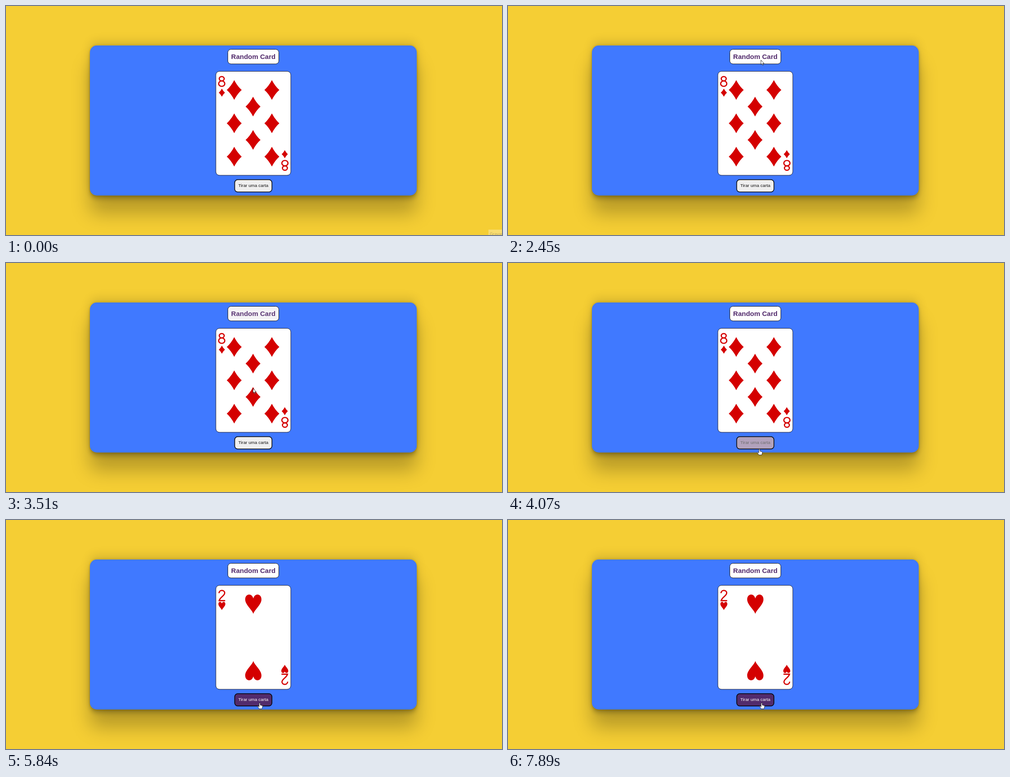
Write an HTML page that moves like this. It is 1099 px wide and 510 px high and loops after 8 s.

```html
<!DOCTYPE html>
<html lang="pt">
<head>
<meta charset="utf-8">
<title>Random Card</title>
<style>
html, body { margin: 0; width: 100%; height: 100%; overflow: hidden; background: #f5ce34; }
#panel {
  position: absolute; left: 186px; top: 88px; width: 724px; height: 334px;
  border-radius: 15px; background: #4079ff;
  box-shadow: 0 40px 41px rgba(0,0,0,.25), 0 -9px 22px rgba(0,0,0,.12), 0 3px 4px rgba(0,0,0,.12),
    0 9px 10px rgba(0,0,0,.17), 0 -2px 4px rgba(0,0,0,.09);
}
svg { position: absolute; left: 0; top: 0; }
text { font-family: "Liberation Sans", Arial, sans-serif; text-anchor: middle; }
.rank { fill: none; stroke-width: 2.7; }
.line { fill: none; }
.navy { fill: #16246e; }
.red { fill: #d40000; }
.skin { fill: #fff; stroke: #16246e; }
</style>
</head>
<body>
<div id="panel"></div>
<svg width="1099" height="510" viewBox="0 0 1099 510">
  <defs>
    <path id="diamond" d="M0-22Q7-8.5 16.5 0Q7 8.5 0 22Q-7 8.5-16.5 0Q-7-8.5 0-22z"/>
    <path id="heart" d="M0 21.500C-3 12-18 1-18-10.500C-18-18-13.500-21.500-9.500-21.500C-4-21.500-1-17 0-12.500C1-17 4-21.500 9.500-21.500C13.500-21.500 18-18 18-10.500C18 1 3 12 0 21.500z"/>
    <g id="club">
      <circle cy="-9.3" r="9.2"/><circle cx="-9.3" cy="4" r="9.2"/><circle cx="9.3" cy="4" r="9.2"/>
      <path d="M-2-4H2Q2 14 7 18.700H-7Q-2 14-2-4z"/>
    </g>
    <g id="rank8"><ellipse cx="478" cy="162" rx="5.4" ry="4.9"/><ellipse cx="478" cy="173" rx="6.8" ry="6"/></g>
    <path id="rank2" d="M472 163C472 155 484.500 155 484.500 162.500C484.500 169 474 172 472.300 179.600H485.600"/>
    <path id="rankJ" d="M476.500 156.200H486M482.500 156V172C482.500 181.500 472 181 471.500 173"/>

    <pattern id="lattice" width="6" height="8" patternUnits="userSpaceOnUse">
      <path fill="#fff" d="M0 0H6V8H0z"/>
      <path stroke="#16246e" stroke-width="1.8" d="M0 0L6 8M6 0L0 8"/>
    </pattern>
    <pattern id="gold" width="6" height="6" patternUnits="userSpaceOnUse">
      <path fill="#dcc01e" d="M0 0H6V6H0z"/>
      <path stroke="#000" stroke-width="1.6" d="M0 0L6 6M6 0L0 6"/>
    </pattern>
    <pattern id="hair" width="3.5" height="9" patternUnits="userSpaceOnUse">
      <path fill="#dcc01e" d="M0 0H3.500V9H0z"/><path d="M0 0H1V9H0z"/>
    </pattern>
    <pattern id="dots" x="598" width="9" height="8" patternUnits="userSpaceOnUse">
      <path d="M0 0H9V8H0z"/><path fill="#dcc01e" d="M3 0L5 2L3 4L1 2zM6.500 4L8.500 6L6.500 8L4.500 6z"/>
    </pattern>
    <clipPath id="upper"><path d="M489 166H607V287L489 235z"/></clipPath>

    <g id="figure" stroke="#000">
      <g clip-path="url(#upper)">
        <path class="navy" d="M498 220L530 204H578L597 222V300H498z"/>
        <path class="red" d="M530 212L576 214V280L530 260z"/>
        <path class="line" stroke-width="5" d="M532 208V255M543 212V262M565 220V280"/>
        <path fill="url(#gold)" d="M546 234H561V275H546z"/>
        <path class="line" stroke="#dcc01e" stroke-width="1.5" d="M537 210V258M571 220V278"/>
        <path class="line" stroke="url(#lattice)" stroke-width="10" d="M526 205Q518 224 519 252"/>
        <path class="red" stroke-width="3" d="M581 222L596 238V278L588 264z"/>
        <path class="line" stroke="#dcc01e" d="M584 230Q590 248 595 256"/>
        <path class="line" stroke="url(#lattice)" stroke-width="10" d="M572 214Q573 242 584 262T594 292"/>
        <path class="skin" d="M588 223Q595 214 605 220L603 233L592 232zM594 225H603"/>
        <path class="skin" d="M550 204L555 219L566 226L577 216V200z"/>
        <path class="skin" d="M554 183H582V205Q579 216 569 217Q558 213 554 202z"/>
        <path class="line" stroke="#16246e" stroke-width="1.3" d="M558 191Q563 187 567 191M572 190Q577 187 580 190M559 195H566M573 194H579M570 190L572 203L567 204M564 209H573M567 212H571"/>
        <path fill="url(#hair)" d="M535 184H556Q554 195 556 203Q553 211 544 207Q532 210 530 202Q538 202 535 184zM580 183H585Q583 193 586 204L581 211z"/>
        <path class="red" d="M527 167H588L582 183Q558 178 534 184zM542 167L546 181M557 167V180M573 167L570 181"/>
        <path class="line" stroke-width="5" d="M533 182Q558 176 584 182"/>
        <path class="line" stroke="#dcc01e" stroke-width="3" stroke-dasharray="3 1" d="M533 182Q558 176 584 182"/>
        <path fill="#dcc01e" d="M588 169Q596 172 594 180L588 186Q590 178 588 169z"/>
      </g>
      <path fill="url(#dots)" stroke="#dcc01e" d="M598 190H606.500V312L598 322z"/>
      <path class="red" stroke="#dcc01e" stroke-width="2" d="M596 187L605.500 174V187z"/>
    </g>
    <g id="sash" class="line">
      <path id="band" stroke="#000" stroke-width="11" d="M513 244Q532 245 548 261T583 279"/>
      <path stroke="#dcc01e" stroke-width="8" stroke-dasharray="2.5 1.3" d="M513 244Q532 245 548 261T583 279"/>
      <rect x="489" y="166.500" width="118" height="190" stroke="#16246e" stroke-width="1.4"/>
    </g>
  </defs>

  <g id="tip">
    <path fill="#f8dc70" d="M1069 498H1099V510H1069z"/>
    <text x="1072" y="511" fill="#b9a45b" style="font:9px 'Open Sans',sans-serif;text-anchor:start">Gravar</text>
  </g>

  <rect id="head" x="491.500" y="96.500" width="113" height="32.500" rx="7" stroke="#111"/>
  <text id="title" x="548" y="117.500" font-size="15" font-weight="bold">Random Card</text>
  <rect x="465" y="145.500" width="166" height="231.500" rx="8" fill="#fff" stroke="#1c1c2c"/>
  <g id="card"></g>
  <rect id="button" x="506.700" y="386.700" width="82.600" height="27.600" rx="7" stroke="#000" stroke-width="1.500"/>
  <text id="label" x="548" y="403" font-size="9.870">Tirar uma carta</text>

  <g id="cursor" fill="#fff" stroke="#111" stroke-width=".8" stroke-linejoin="round">
    <circle id="click" r="9.200" fill="#f00" fill-opacity=".5" stroke="none"/>
    <path id="arrow" d="M.4.4V10.500L2.700 8.400L4.400 12L5.900 11.300L4.300 7.900H7.500z"/>
    <path id="hand" d="M-1.200 1.200Q0-.6 1.200 1.200V5L5.800 6.300Q7 7 6.500 9L5.200 13.500H-1.300L-4.300 8.500Q-4 6.600-2.500 7.800L-1.200 9z"/>
  </g>
</svg>
<script>
const LOOP = 8000, EASE_MS = 500, LOAD_MS = 260;
const WHITE = [255, 255, 255], PURPLE = [82, 43, 108], GREY = [239, 239, 239], INK = [17, 17, 17];
const el = id => document.getElementById(id);
const show = (id, on) => el(id).style.display = on ? '' : 'none';

// Cards: everything symmetric is drawn once and turned about the centre
const use = (id, x = 0, y = 0, k = 1) => `<use href="#${id}" transform="translate(${x} ${y}) scale(${k})"/>`;
const both = s => `${s}<g transform="rotate(180 548 261.5)">${s}</g>`;
const corner = (rank, suit, y, k) =>
  `<g class="rank" stroke="currentColor">${use('rank' + rank)}</g>` + use(suit, 478.3, y, k);
const tint = (color, s) => `<g fill="${color}" color="${color}">${s}</g>`;

function eight() {
  let pips = '';
  for (let row = 0; row < 5; row++) {
    for (const dx of row % 2 ? [0] : [-41.7, 41.7]) pips += use('diamond', 547.4 + dx, 187 + 37.1 * row);
  }
  return tint('#d40000', both(corner(8, 'diamond', 193, .41)) + pips);
}
const two = () => tint('#d40000', both(corner(2, 'heart', 191.5, .43) + use('heart', 548, 187.5)));
const jack = () =>
  tint('#000', both(use('figure') + corner('J', 'club', 191.5, .49) + use('club', 509.5, 188.5))) + use('sash');

const deck = [eight(), two(), jack(), two()];
const clicks = [[4210, 4360], [5690, 5840], [6830, 6970], [7820, 7890]];

// Pointer key points: time, x, y
const path = [
  [330, 992, 504], [400, 983, 504], [600, 978, 502], [810, 951, 502], [1200, 951, 502],
  [1630, 683, 390], [1760, 647, 338], [1970, 672, 212], [2100, 672, 212], [2450, 560, 120],
  [2520, 556, 115], [3020, 556, 117], [3160, 552, 144], [3370, 547, 232], [3790, 547, 372],
  [4070, 557, 414], [4880, 557, 414], [5160, 562, 407]
];

function pointer(t) {
  const i = path.findIndex(p => p[0] > t);
  if (i < 0) return path[path.length - 1].slice(1);
  if (!i) return null;
  const [a, b] = [path[i - 1], path[i]], u = (t - a[0]) / (b[0] - a[0]);
  return [1, 2].map(c => Math.round(a[c] + (b[c] - a[c]) * u));
}

// CSS "ease" curve by bisection
function ease(x) {
  let lo = 0, hi = 1, s;
  for (let i = 0; i < 20; i++) {
    s = (lo + hi) / 2;
    if (.75 * s * (1 - s) + s ** 3 < x) lo = s; else hi = s;
  }
  return .3 * s * (1 - s) ** 2 + 3 * s * s * (1 - s) + s ** 3;
}
const fade = (t, start) => ease(Math.min(1, Math.max(0, (t - start) / EASE_MS)));
const mix = (a, b, k) => `rgb(${a.map((v, i) => Math.round(v + (b[i] - v) * k))})`;
const paint = (id, a, b, k) => el(id).setAttribute('fill', mix(a, b, k));

let shown = -1;
function draw(now) {
  const t = now % LOOP;
  show('tip', t < 70);

  const head = fade(t, 2450) - fade(t, 3160), press = fade(t, 3950);
  paint('head', WHITE, PURPLE, head);
  paint('title', PURPLE, WHITE, head);
  paint('button', GREY, PURPLE, press);
  paint('label', INK, WHITE, press);

  const card = clicks.filter(([, up]) => t >= up + LOAD_MS).length;
  if (card !== shown) el('card').innerHTML = deck[shown = card];

  const at = pointer(t);
  show('cursor', at);
  if (at) {
    el('cursor').setAttribute('transform', `translate(${at})`);
    show('click', clicks.some(([down, up]) => t >= down && t < up));
    show('hand', t >= 3930);
    show('arrow', t < 3930);
  }
  requestAnimationFrame(draw);
}
requestAnimationFrame(draw);
</script>
</body>
</html>
```
